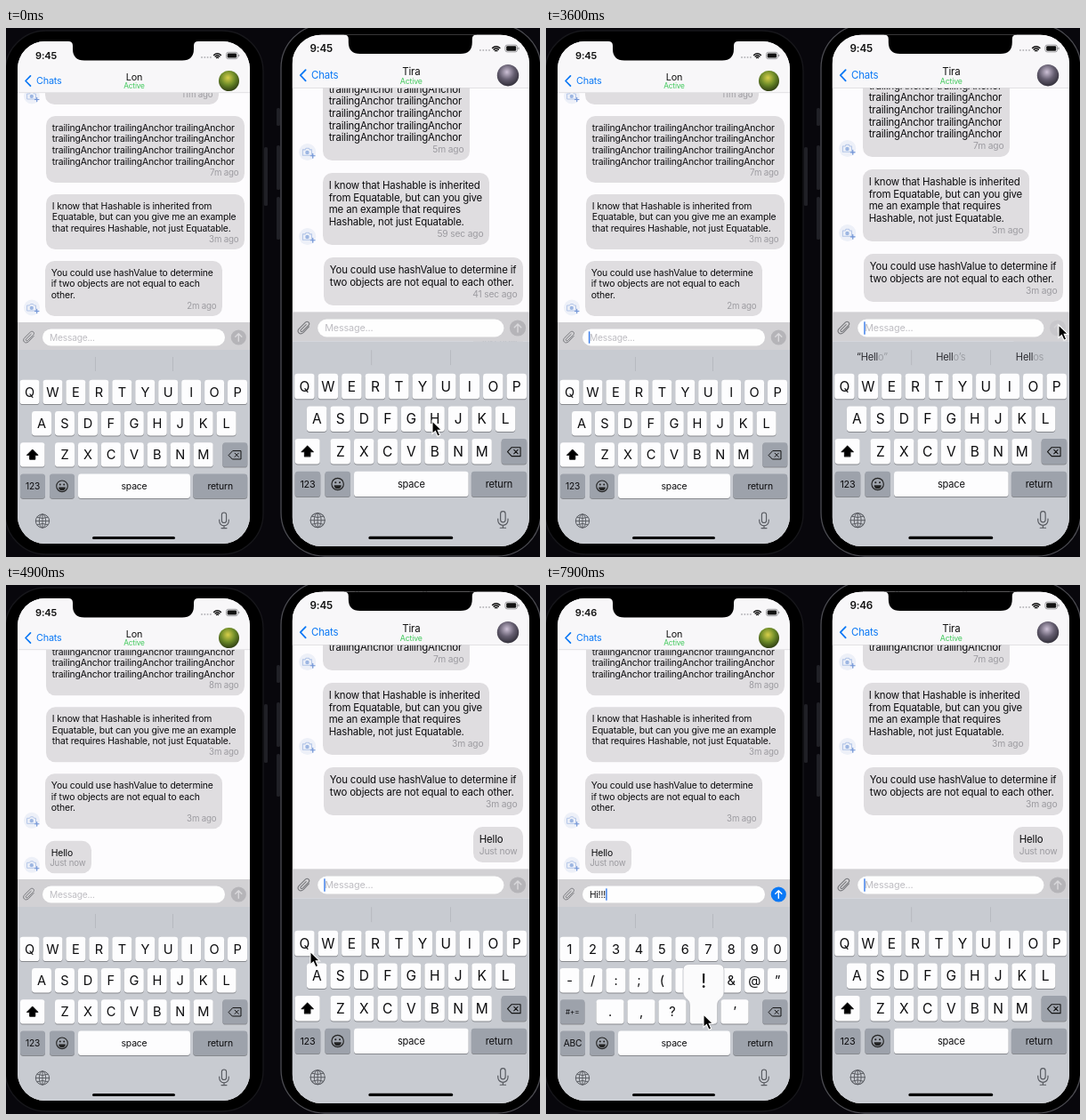
These frames come from a looping animation (600x595 px, 8000 ms). An HTML page:

```html
<!DOCTYPE html>
<html lang="en">
<head>
<meta charset="utf-8">
<title>Two phones chatting</title>
<style>
html, body { margin: 0; width: 100%; height: 100%; overflow: hidden; background: #08070c; }
svg { display: block; width: 600px; height: 595px; font-family: Inter, Roboto, sans-serif; letter-spacing: -.01em; }
text { white-space: pre; }
</style>
</head>
<body>
<svg id="stage" viewBox="0 0 600 595"></svg>
<script>
const LOOP = 8000;
const BLUE = '#0a78f5', INK = '#0b0b0d';
const stage = document.getElementById('stage');
const pen = document.createElement('canvas').getContext('2d');

// drawing helpers
const rect = (x, y, w, h, r, fill, extra = '') =>
  `<rect x="${x}" y="${y}" width="${w}" height="${h}" rx="${r}" fill="${fill}" ${extra}/>`;
const circle = (x, y, r, fill, extra = '') => `<circle cx="${x}" cy="${y}" r="${r}" fill="${fill}" ${extra}/>`;
const line = (d, color, width, extra = '') =>
  `<path d="${d}" fill="none" stroke="${color}" stroke-width="${width}" stroke-linecap="round" stroke-linejoin="round" ${extra}/>`;
const text = (x, y, str, size, fill = INK, anchor = 'start', extra = '') =>
  `<text x="${x}" y="${y + size * .36}" font-size="${size}" fill="${fill}" text-anchor="${anchor}" ${extra}>${str}</text>`;
const at = (x, y, k, body) => `<g transform="translate(${x} ${y}) scale(${k})">${body}</g>`;
const ease = p => { p = Math.min(1, Math.max(0, p)); return p * p * (3 - 2 * p); };
const textWidth = (str, size) => {
  pen.font = `${size}px Inter, Roboto, sans-serif`;
  return pen.measureText(str).width - str.length * size * .01;
};
const latest = (list, t) => list.filter(e => e[0] <= t).pop();

const anchors = n => Array(n).join('trailingAnchor ') + 'trailingAnchor';
const rows = (n, s) => Array(n).fill(s);

// Positions follow the left phone; x, hy (header), iy (input bar) and ky (keyboard) map them to each device.
const phones = [
  {
    id: 'a', name: 'Lon', k: 1, size: 10.4, top: 15, bottom: 580, notch: 36.5, corner: 31,
    x: v => v, hy: v => v, iy: v => v, ky: v => v,
    body: [-1, 3, 290, 589, 46, '#17171b'],
    photo: ['#d8cf4a', '#6c8a28', '#26330f'],
    pitch: 12.65, first: 13, stamp: 11.5,
    sent: Infinity,
    scroll: { start: 3740, time: 400, by: 49.7 },
    messages: [
      [44, 24, 195, 62, [''], '11m ago', '11m ago', 1],
      [45, 99, 223, 75, rows(4, anchors(3)), '7m ago', '8m ago'],
      [45, 187, 223, 62, ['I know that Hashable is inherited from', 'Equatable, but can you give me an example', 'that requires Hashable, not just Equatable.'], '3m ago', '3m ago'],
      [44, 262, 199, 62, ['You could use hashValue to determine', 'if two objects are not equal to each', 'other.'], '2m ago', '3m ago', 1],
      [44, 337.5, 52, 36.5, ['Hello'], 'Just now', 'Just now', 1]
    ],
    typed: [[0, ''], [5480, 'H'], [5900, 'Hi'], [7320, 'Hi!'], [7540, 'Hi!!'], [7740, 'Hi!!!']],
    modes: [[0, 'upper'], [5480, 'lower'], [6620, 'symbol']],
    presses: [[5350, 5480, 'H'], [5780, 5900, 'i'], [7220, 7320, '!'], [7440, 7540, '!'], [7640, 7740, '!'], [7830, 8000, '!']],
    caret: t => (t + 700) % 1000 < 600 && t > 200
  },
  {
    id: 'b', name: 'Tira', k: 1.06, size: 11.4, top: 7.5, bottom: 583, notch: 29, corner: 33,
    x: v => 335.4 + (v - 26.5) * 1.0205,
    hy: v => 23 + (v - 31) * 1.06,
    iy: v => 337.5 + (v - 348) * 1.065,
    ky: v => 513 + (v - 515.3) * 1.038,
    body: [309, -4, 292, 598, 49, '#4c4c52'],
    photo: ['#cdc1d6', '#655e70', '#2a2831'],
    pitch: 13.7, first: 13.8, stamp: 12.5,
    sent: 3450,
    scroll: { start: 3530, time: 420, by: 53 },
    messages: [
      [356, 41, 165, 108, rows(6, anchors(2)), '5m ago', '7m ago', 1],
      [356, 163, 187, 81, ['I know that Hashable is inherited', 'from Equatable, but can you give', 'me an example that requires', 'Hashable, not just Equatable.'], '59 sec ago', '3m ago', 1],
      [357, 258, 224, 54, ['You could use hashValue to determine if', 'two objects are not equal to each other.'], '41 sec ago', '3m ago'],
      [525, 325, 56, 40, ['Hello'], 'Just now', 'Just now']
    ],
    typed: [[0, ''], [280, 'H'], [930, 'He'], [1560, 'Hel'], [1860, 'Hell'], [2470, 'Hello'], [3450, '']],
    modes: [[0, 'upper'], [280, 'lower'], [3450, 'upper']],
    presses: [[150, 280, 'H'], [800, 930, 'e'], [1450, 1560, 'l'], [1750, 1860, 'l'], [2330, 2470, 'o']],
    caret: t => t > 280 && (t + 400) % 1000 < 550
  }
];

const suggestions = {
  H: ['Have', 'He'], He: ['Helb', 'Hey'], Hel: ['Help', 'Hello'],
  Hell: ['Hello', ''], Hello: ['Hello’s', 'Hellos'], Hi: ['His', 'Him']
};

const pointerPath = [
  [0, 479, 442], [300, 479, 442], [750, 388, 405], [950, 388, 405], [1350, 562, 434], [1900, 562, 434],
  [2300, 551, 408], [2550, 551, 408], [3100, 576, 334], [3600, 576, 334], [4000, 594, 347], [4150, 594, 347],
  [4600, 480, 385], [5250, 168, 447], [5480, 168, 447], [5690, 205, 413], [5950, 205, 413],
  [6450, 24, 517], [6700, 24, 517], [7150, 177, 483], [LOOP, 177, 483]
];

function pointer(t) {
  const i = pointerPath.findIndex(p => p[0] > t);
  const [t0, x0, y0] = pointerPath[i - 1], [t1, x1, y1] = pointerPath[i];
  const p = ease((t - t0) / (t1 - t0));
  return at(x0 + (x1 - x0) * p, y0 + (y1 - y0) * p, 1,
    '<path d="M0 0V14.5L3.4 11.4L6 17.2L8.7 16L6.2 10.4H10.6Z" fill="#000" stroke="#fff" stroke-width="1.1"/>');
}

function contactIcon(x, y, k) {
  return at(x, y, k, circle(0, 0, 9, '#edf0f8') +
    line('M-5 -2.5H-2.5L-1.5 -4H1.5L2.5 -2.5H4.5V3.5H-5Z', '#b4c6e8', 1) +
    circle(-.2, .4, 2.1, '#9db6e2') + line('M3.4 4H8M5.7 1.7V6.3', '#6f93d6', 1.1));
}

function messages(p, t) {
  const { start, time, by } = p.scroll;
  const dy = -by * ease((t - start) / time);
  return p.messages.map(([x, y, w, h, lines, before, after, icon]) => {
    const top = y + dy;
    return rect(x, top, w, h, 10.5, '#dfdde0') +
      lines.map((s, i) => text(x + 6.8, top + p.first + i * p.pitch, s, p.size)).join('') +
      text(x + w - 6.5, top + h - p.stamp, t < start - 30 ? before : after, 9.7 * p.k, '#9c9ba0', 'end') +
      (icon ? contactIcon(p.id === 'a' ? 29 : 338.7, top + h - 9.5, p.k) : '');
  }).join('');
}

function header(p, t) {
  const { x, hy, k } = p, left = x(13), width = x(274) - left;
  const bottom = hy(73);
  const n = p.notch, a = x(70), b = x(216);
  const wifi = [5.4, 3.3, 1.3].map(r => line(`M${-r * .72} ${-r * .72}A${r} ${r} 0 0 1 ${r * .72} ${-r * .72}`, '#111', 1.5)).join('');
  return rect(left, p.top, width, bottom - p.top, 0, '#f8f7f9') +
    rect(left, bottom - .5, width, .6, 0, '#d3d2d5') +
    `<path d="M${a} ${p.top - 2}H${b}V${p.top}Q${b - 5} ${p.top} ${b - 5} ${p.top + 5}V${n - 13}Q${b - 5} ${n} ${b - 18} ${n}H${a + 18}Q${a + 5} ${n} ${a + 5} ${n - 13}V${p.top + 5}Q${a + 5} ${p.top} ${a} ${p.top}Z" fill="#000"/>` +
    text(x(45), hy(31), t < 6000 ? '9:45' : '9:46', 11 * k, '#111', 'middle', 'font-weight="600"') +
    [0, 1, 2, 3].map(i => circle(x(220 + i * 3.3), hy(33), 1, '#b9b8bc')).join('') +
    at(x(237.5), hy(34.4), k, wifi) +
    at(x(247.5), hy(31), k, rect(0, -3.7, 12.8, 7.4, 2.2, 'none', 'stroke="#8a8a8d" stroke-width=".8"') +
      rect(1.2, -2.5, 10.4, 5, 1.2, '#111') + rect(13.7, -1.3, 1, 2.6, .5, '#8a8a8d')) +
    at(x(22), hy(59.5), k, line('M5.5 -5.7L0 0L5.5 5.7', BLUE, 1.7)) +
    text(x(34), hy(59.5), 'Chats', 10.8 * k, BLUE) +
    text(x(144), hy(55), p.name, 10.8 * k, '#111', 'middle') +
    text(x(144), hy(65.5), 'Active', 8.3 * k, '#41c95c', 'middle') +
    circle(x(250.5), hy(59.5), 11.5 * k, `url(#photo-${p.id})`);
}

function inputBar(p, t, typed) {
  const { x, iy, k } = p, y = iy(348), size = 10.2 * k;
  const start = x(48.9), top = iy(331);
  const caretX = start + (typed ? textWidth(typed, size) + .6 : -.4);
  const buttonAlpha = t < p.sent ? 1 : ease((t - p.sent) / 400);
  return rect(x(13), top, x(274) - x(13), iy(362) - top, 0, '#d2d1d4') +
    at(x(26), y, k, line('M5.2 -1.5L-.5 4.6C-4.5 8.2 -8.5 3.7 -5 .3L1.4 -6C4 -8.2 7 -5 4.6 -2.6L-1.6 3.4C-3 4.5 -4.5 3 -3.3 1.7L2.2 -3.6', '#77787c', 1)) +
    rect(x(41), iy(338.6), x(246) - x(41), iy(357.4) - iy(338.6), 9.8 * k, '#fefefe') +
    text(start, y, typed || 'Message...', size, typed ? INK : '#bebdc2') +
    (typed || p.caret(t) ? rect(caretX - .6, y - 6.8 * k, 1.4, 13.6 * k, .5, '#3478e8') : '') +
    `<g opacity="${buttonAlpha}">` + circle(x(261.3), y, 8.6 * k, typed ? BLUE : '#b5b4b8') +
    at(x(261.3), y, k, line('M0 4.3V-4M-3.5 -.7L0 -4.2L3.5 -.7', typed ? '#fff' : '#d9d8db', 1.4)) + '</g>';
}

function suggestionBar(p, t, typed) {
  const { x, ky, k } = p, y = ky(378);
  const dividers = [100, 187].map(v => rect(x(v), ky(370), .7, 16 * k, 0, '#b0b3b9')).join('');
  const age = t - p.sent;
  const fading = age >= 0 && age < 300;
  const word = fading ? 'Hello' : typed;
  if (!suggestions[word]) return dividers;
  const tail = fading ? 1 - ease(age / 220) : 1;
  const head = fading ? 1 - ease((age - 110) / 190) : 1;
  const labels = [`“${word}”`, ...suggestions[word]];
  return dividers + labels.map((s, i) => {
    const cut = i ? 4 : 5;
    const body = `<tspan fill-opacity="${head}">${s.slice(0, cut)}</tspan><tspan fill-opacity="${tail}">${s.slice(cut)}</tspan>`;
    return text(x([57, 143.5, 230.5][i]), y, body, 10.4 * k, '#16161a', 'middle');
  }).join('');
}

// Letter keys of a mode as [label, centre x, centre y, width]
function keyList(mode) {
  const spread = (labels, x0, y, step = 25.95, w = 22) => [...labels].map((c, i) => [c, x0 + i * step, y, w]);
  if (mode === 'symbol')
    return [...spread('1234567890', 26.5, 409.5), ...spread('-/:;()$&@”', 26.5, 444.8), ...spread('.,?!’', 72, 480, 35, 31)];
  const keys = [...spread('QWERTYUIOP', 26.5, 409.5), ...spread('ASDFGHJKL', 40, 444.8), ...spread('ZXCVBNM', 66, 480)];
  return mode === 'lower' ? keys.map(([c, ...rest]) => [c.toLowerCase(), ...rest]) : keys;
}

function keyboard(p, mode, pressed) {
  const { x, ky, k } = p;
  const DARK = '#9da2ab', lower = mode === 'lower', symbol = mode === 'symbol';
  const key = (cx, cy, w, fill) => {
    const left = x(cx - w / 2), top = ky(cy - 13.8), kw = x(cx + w / 2) - left, kh = ky(cy + 13.6) - top;
    return rect(left, top + 1, kw, kh, 3.4, '#87898e') + rect(left, top, kw, kh, 3.4, fill);
  };
  const label = (cx, cy, s, size) => text(x(cx), ky(cy), s, size * k, '#0c0c0e', 'middle');
  const letter = (cx, cy, s) => lower ? label(cx, cy - 1.4, s, 16.3) : label(cx, cy, s, 14.6);
  const keys = keyList(mode);
  const hit = keys.find(e => e[0] === pressed);

  let out = keys.map(([c, cx, cy, w]) => key(cx, cy, w, '#fdfdfe') + letter(cx, cy, c)).join('');
  out += key(29.7, 480, 27.5, mode === 'upper' ? '#fdfdfe' : DARK);
  out += symbol ? label(29.7, 480.5, '#+=', 8) :
    at(x(29.7), ky(480), k, `<path d="M0 -6L6.3 .4H3.1V5.2H-3.1V.4H-6.3Z" fill="${lower ? 'none' : '#000'}" stroke="#111" stroke-width="1" stroke-linejoin="round"/>`);
  out += key(257.3, 480, 28, DARK) +
    at(x(257.3), ky(480.3), k, line('M-7 0L-2.6 -4.7H6.7V4.7H-2.6ZM-.2 -2.1L4 2.1M4 -2.1L-.2 2.1', '#111', 1));
  out += key(30, 515.3, 28, DARK) + label(30, 515.3, symbol ? 'ABC' : '123', 10.2);
  out += key(63, 515.3, 28, DARK) + at(x(63), ky(515.3), k,
    circle(0, 0, 6.3, 'none', 'stroke="#222" stroke-width="1.1"') + circle(-2.2, -1.7, 1, '#222') + circle(2.2, -1.7, 1, '#222') +
    '<path d="M-3.8 1.1H3.8A3.8 3.8 0 0 1 -3.8 1.1Z" fill="#222"/>');
  out += key(144, 515.3, 126, '#fdfdfe') + label(144, 515.3, 'space', 10.4);
  out += key(240.7, 515.3, 61, DARK) + label(240.7, 515.3, 'return', 10.4);
  out += at(x(41), ky(554.5), k, circle(0, 0, 7.6, 'none', 'stroke="#55585e" stroke-width="1"') +
    line('M0 -7.6V7.6M-7.6 0H7.6M-6 -4.2Q0 -1.6 6 -4.2M-6 4.2Q0 1.6 6 4.2', '#55585e', .9) +
    '<ellipse rx="3.7" ry="7.6" fill="none" stroke="#55585e" stroke-width=".9"/>');
  out += at(x(245), ky(554), k, rect(-2.6, -9, 5.2, 11.5, 2.6, 'none', 'stroke="#55585e" stroke-width="1.1"') +
    line('M-5.3 -1V.6A5.3 5.3 0 0 0 5.3 .6V-1M0 6V8.6M-3 8.6H3', '#55585e', 1.1));
  out += rect(x(97), ky(573.5) - 1.6, x(190) - x(97), 3.2, 1.6, '#000');

  if (hit) {
    const [c, cx, cy, w] = hit;
    const mid = x(cx), half = (x(cx + w / 2) - x(cx - w / 2)) / 2, head = Math.max(20, half + 7.5);
    const top = ky(cy - 53.5), neck = ky(cy - 23), foot = ky(cy - 10), base = ky(cy + 13.6);
    out += `<path d="M${mid - head + 7} ${top}H${mid + head - 7}Q${mid + head} ${top} ${mid + head} ${top + 7}V${neck}` +
      `C${mid + head} ${neck + 10} ${mid + half} ${foot - 6} ${mid + half} ${foot + 3}V${base - 3}Q${mid + half} ${base} ${mid + half - 3} ${base}` +
      `H${mid - half + 3}Q${mid - half} ${base} ${mid - half} ${base - 3}V${foot + 3}` +
      `C${mid - half} ${foot - 6} ${mid - head} ${neck + 10} ${mid - head} ${neck}V${top + 7}Q${mid - head} ${top} ${mid - head + 7} ${top}Z" ` +
      'fill="#fbfbfc" stroke="#a9acb2" stroke-width=".6"/>' +
      label(cx, lower ? cy - 35.5 : cy - 34.5, c, lower ? 24 : 22);
  }
  return out;
}

function phone(p, t) {
  const { x, iy } = p, left = x(13), width = x(274) - left;
  const typed = latest(p.typed, t)[1], mode = latest(p.modes, t)[1];
  const press = p.presses.find(e => t >= e[0] && t < e[1]);
  const [bx, by, bw, bh, br, edge] = p.body;
  const [c0, c1, c2] = p.photo;
  return `<defs><clipPath id="screen-${p.id}">${rect(left, p.top, width, p.bottom - p.top, p.corner, '#fff')}</clipPath>` +
    `<radialGradient id="photo-${p.id}" cx=".45" cy=".35" r=".7"><stop stop-color="${c0}"/><stop offset=".5" stop-color="${c1}"/><stop offset="1" stop-color="${c2}"/></radialGradient></defs>` +
    rect(bx, by, bw, bh, br, '#000', `stroke="${edge}" stroke-width="1.3"`) +
    `<g clip-path="url(#screen-${p.id})">` +
    rect(left, p.top, width, p.bottom - p.top, 0, '#fdfcfe') +
    messages(p, t) + header(p, t) + inputBar(p, t, typed) +
    rect(left, iy(362), width, 240, 0, '#c8cbd1') +
    suggestionBar(p, t, typed) + keyboard(p, mode, press && press[2]) + '</g>';
}

const sideButtons = [[290, 134, 66], [304, 90, 20], [304, 132, 50], [304, 190, 48]]
  .map(([x, y, h]) => rect(x, y, 4, h, 1.5, '#202026')).join('');

function render(t) {
  stage.innerHTML = sideButtons + phones.map(p => phone(p, t)).join('') + pointer(t);
}

let origin;
function tick(now) {
  origin ??= now;
  render((now - origin) % LOOP);
  requestAnimationFrame(tick);
}
render(0);
requestAnimationFrame(tick);
</script>
</body>
</html>
```
